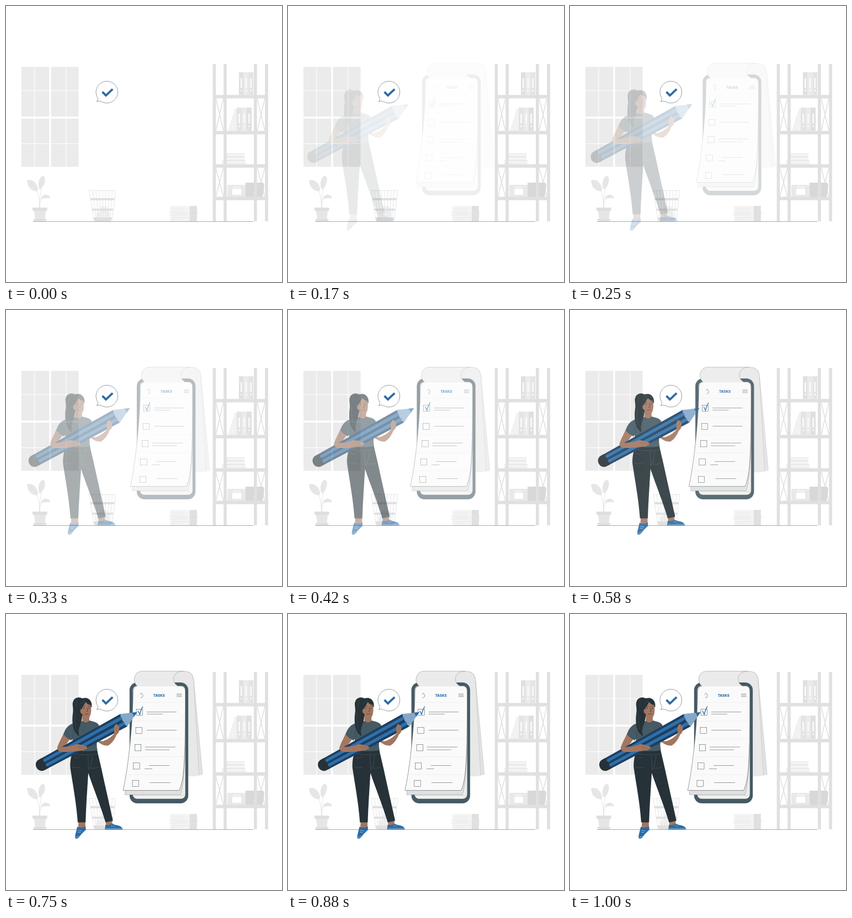
Animation, 500 px wide and 500 px high, one loop 1.04 s. Source, as an HTML page:

```html
<!DOCTYPE html>
<html lang="en">
<head>
<meta charset="utf-8">
<title>Task list</title>
<style>
  html, body { margin: 0; width: 100%; height: 100%; overflow: hidden; background: #fff; }
  svg { display: block; width: 100vw; height: 100vh; }
  .blue { fill: #2a6aa5; }
  .skin { fill: #a27660; }
  .dark { fill: #263238; }
  .shirt { fill: #455a64; }
  .ink { fill: none; stroke: #263238; stroke-width: .48; }
  .seam { fill: none; stroke: #63737a; stroke-width: .4; }
</style>
</head>
<body>
<svg viewBox="0 0 500 500" xmlns="http://www.w3.org/2000/svg">
  <!-- window -->
  <path fill="#ebebeb" d="M28 110.3H78.3V200.5H28ZM81.6 110.3H131.5V200.5H81.6ZM28 204H78.3V291.2H28ZM81.6 204H131.5V291.2H81.6Z"/>
  <path stroke="#fff" stroke-width="1.1" d="M52 110V291M109 110V291M28 153.3H132M28 249.5H132"/>

  <g id="shelf"></g>

  <!-- plant -->
  <g fill="#e6e6e6">
    <path d="M38 316C43 313 52 317 55 323C58 328 59 333 57 335C51 337 42 331 40 325Z"/>
    <path d="M61 332C57 326 59 310 66 308C72 307 72 318 68 325C66 329 63 332 61 332Z"/>
    <path d="M63 350C64 343 70 341 74 342C78 343 80 346 80 348C74 348 67 348 63 350Z"/>
    <path d="M51 371H72L70.5 386H52.5Z"/>
  </g>
  <path fill="none" stroke="#e0e0e0" stroke-width=".8" d="M56 334Q61 348 60.5 366M64 330Q60 347 61 366M66 347Q61 352 61 366"/>
  <path fill="#dedede" d="M48 365.3H74.5V371H48ZM49 386H74L72 389.8H51Z"/>

  <!-- basket -->
  <path fill="#f2f2f2" d="M163 383L164 375L170 371L172 363L181 362L187 368L188 383Z"/>
  <path fill="none" stroke="#e6e6e6" stroke-width=".7" d="M164 376L172 380L178 370L186 378M172 365L179 372"/>
  <g id="basket" fill="none" stroke="#e0e0e0"></g>
  <path fill="#e0e0e0" d="M152.6 348H197L196.3 352H153.2ZM155.5 367.3H194.2L193.6 370.8H156ZM158 383H192.2L191 388L189 390H161L159 388Z"/>

  <!-- paper stack -->
  <path fill="#f3f3f3" d="M297.5 362.3H333V390H297.5Z"/>
  <path fill="#e0e0e0" d="M333 362.3H345.8V390H333ZM345 374H348V375.5H345ZM345 380H347V381.2H345Z"/>
  <path fill="none" stroke="#e3e3e3" stroke-width=".6" d="M298 368H325M294 373.5H328M303 376H333M294 378.5H326M300 383.5H333M298 387H318"/>

  <path stroke="#263238" stroke-width=".42" d="M49 390.5H448"/>

  <!-- speech bubble -->
  <path class="ink" style="fill:#fff" d="M164.2 173.3Q167 170.5 166.4 167.2A19.8 19.8 0 1 1 172.2 172.8Q169 171.2 164.2 173.3Z"/>
  <path fill="none" stroke="#2a6aa5" stroke-width="3.8" d="M174.6 155.6L181 162.1L193.2 150.7"/>

  <!-- phone with paper list -->
  <g id="phone">
    <path fill="#e2e2e2" d="M322 104C337 103 341 110 341.5 124L357 290Q350 292 346 291L331 293V110Z"/>
    <path fill="#e8e8e8" d="M322 103.6C309 104 304 111 304.5 119L308 127L331 140V293.5Q341 295 350.5 292.5L341.2 126C340.8 111 337 104 322 103.6Z"/>
    <path class="ink" style="stroke:#aaa;stroke-width:.4" d="M341 125L350.5 292.5M341.5 124L357 290Q353 292 350.5 291.5"/>
    <path class="ink" style="stroke:#777;stroke-width:.4" d="M322 103.6C336 104 341 110 341.4 126"/>
    <rect x="224.8" y="124" width="106.3" height="219" rx="14" fill="#455a64"/>
    <rect x="230.6" y="130" width="95.2" height="204.8" rx="8" fill="#f0f0f0"/>
    <path fill="#ededed" stroke="#999" stroke-width=".3" d="M231 320V328H316Q322 333 325.5 325V200H300Z"/>
    <path fill="#e0e0e0" stroke="#777" stroke-width=".4" d="M217 318L216.3 327.6H317Q323 312 325.6 240L310 230Z"/>
    <path class="ink" style="fill:#fafafa" d="M240 130.4C234 130.6 231.4 134 231.2 142C230.8 175 228 215 224 250Q219.5 290 213.2 319.6H314.8Q321 306 323 280C325.6 245 325.9 190 325.8 139Q325.4 130.6 318 130.4Z"/>
    <path fill="#ebebeb" d="M239 131Q232.6 125 233.2 117Q235 105 246 103.6H322C309 104 304 111 304.5 119Q305 126 313 131Z"/>
    <path class="ink" style="stroke:#777;stroke-width:.45" d="M239 131Q232.6 125 233.2 117Q235 105 246 103.6H322C309 104 304 111 304.5 119Q305 126 313 131"/>
    <path fill="none" stroke="#e8e8e8" stroke-width=".6" d="M232 160H325M230 194H325M227 226H325M223 258.5H324M219 291H322"/>
    <text x="278.3" y="150.2" text-anchor="middle" class="blue" font-family="Inter, sans-serif" font-weight="800" font-size="6.3">TASKS</text>
    <path class="ink" d="M243.8 146.2L246.5 143L249 147L248.2 150.8L245 152M310 144.8H319.5M310 147.2H319.5M310 149.6H319.5"/>
    <g id="rows" class="ink"></g>
    <path fill="none" stroke="#2a6aa5" stroke-width="1.4" d="M240 175.5L243.2 181.8Q245 174 248.8 167.5"/>
  </g>

  <!-- woman with pencil -->
  <g id="woman">
    <g transform="translate(.6 0)">
    <path class="skin" d="M130 374H142L142.5 389H129ZM178.5 372H190.5L191 383H180Z"/>
    <path class="blue" d="M127.5 385.5Q135 389 142.6 384.8L143.2 391C139 395 135 398 132 403Q128 408 124 406.6C122.5 403 125.5 396 127.5 385.5Z"/>
    <path class="blue" d="M178.8 381.5Q185 384 190.6 379.8C196 383 204 382.5 207.5 386Q210 388 209.8 390.2H177.6Z"/>
    <path fill="none" stroke="#fff" stroke-width=".5" d="M129 392L136 393M128 395L134 396M191 382L189 385M195 383L193 386M123.8 405Q128 404 132 402M179 388.6H209"/>
    <path class="dark" d="M120 245H163.2C167 262 171.5 280 175 297L192.2 374.5L178.8 377.5C170 348 157 316 147.5 288C145.8 317 143.5 348 142.6 377.5H128.4C126 342 119 307 115 279C114 266 117 256 120 245Z"/>
    <path class="seam" d="M119 253Q141 257 165 253M147 256L148 282Q153 279 155 256M120 257Q125 265 132 258M151 279Q158 280 166 278M118 277Q127 280 133 277"/>
    <path class="skin" d="M103 216L117 222C112 231 106 238 104 240L112 241L106 251Q92 249 91.4 244C91 239 99 225 103 216ZM158 205L168 212L169 230L178 232L184 238Q174 239 164 231Z"/>
    <path class="shirt" d="M136 194L150 193C157 195 163 196 166 200C169 205 170 216 170.5 222L163.5 226Q162 237 164 247Q142 250 118.5 247L119 226L116.5 229Q107 224 102.5 218C106 207 112 200 121 198Z"/>
    <path class="skin" d="M137 182H149L149.5 193.5Q144 200 136.5 194Z"/>
    <path fill="none" stroke="#263238" stroke-width=".4" d="M119 226Q121 216 120 211M163.5 226Q162 216 160 212M136.5 194Q143 201 150 193.5M121 243L133 245M151 239L163 235"/>
    <path class="dark" d="M136 152.8C130 149.5 122 152 120.3 158C117.5 163 121 170 119.8 178C118 190 119 200 120.5 206Q123 217 131.5 221.5Q128.5 211 132 203Q136 193 136.5 185L150 168L153.5 169C155.5 160 150 152 142 152Z"/>
    <path class="skin" d="M136 171C138.5 166 141 163 142.5 159.5C145.5 163 149 164.5 152 165C153.8 174 152.5 185.5 147.8 188.6C143.5 190.5 138 187 136 180.5C133.6 180.5 132.4 176.5 133.4 173.5Q134.6 170.5 136 173Z"/>
    <path fill="none" stroke="#263238" stroke-width=".65" stroke-linecap="round" d="M136.5 168Q138.5 166 141 167.3M147 167.2Q149 165.8 151 167.2M145.4 170L146.4 176L144.2 176.4M141.5 181.5Q144.5 182 147.3 180.5"/>
    <path class="dark" d="M139.3 169.8a.8 1 0 1 1 0 2a.8 1 0 1 1 0-2M148.8 169.6a.8 1 0 1 1 0 2a.8 1 0 1 1 0-2"/>
    <path fill="none" stroke="#52626a" stroke-width=".4" d="M125 155Q128 159 125 169M123 176Q122 193 126 209M142 154Q139 160 132 164"/>

    <g transform="translate(62.2 273.9) rotate(-28.6)">
      <path fill="#1c3f61" d="M4 -10.8L170.5 -12.8V13L4 10.8Z"/>
      <path fill="#306fa9" d="M4 -7.2L170.5 -8.5V-2.6L4 -2.1ZM4 2.1L170.5 2.6V8.5L4 7.2Z"/>
      <path class="dark" d="M7 -10.9H1C-13 -10.7 -13 10.7 1 10.9H7Q10 8 7 5Q10 0 7 -5Q10 -8 7 -10.9Z"/>
      <path fill="#85a8c9" d="M170.5 -12.8L198.6 -1.2L170.5 13Q167.5 8 169.5 4Q166.5 0 169.5 -4Q167.5 -8 170.5 -12.8Z"/>
      <path class="blue" d="M189.2 -5.1L198.8 -1.2L189.2 3.6Q191 -1 189.2 -5.1Z"/>
    </g>

    <path class="skin" d="M92 240Q105 242 118 238.5L127 235.8C132 236 138 238 145.2 240.2Q147 241.3 143 242L146 243Q146 245 141 245.2Q142 247.5 136 247.3C126 249 112 250.5 100 250Q90 249 92 240Z"/>
    <path class="skin" d="M169 231Q182 230 194.5 217L194.2 207Q194.5 202 197.5 199.8Q200.5 198.5 200.5 202Q204.5 203 203.5 209Q204.5 214 199 218.5Q193 233 183.5 238.5Q174 238.5 169 234Z"/>
    <path fill="none" stroke="#704a3b" stroke-width=".35" d="M128 240L143 242M130 243L141 245M200.5 202Q200 208 197.5 211M203 209L199 215"/>
    </g>
  </g>
</svg>
<script>
  const byId = id => document.getElementById(id);
  const rect = (x, y, w, h, fill) => `<rect x="${x}" y="${y}" width="${w}" height="${h}" fill="${fill}"/>`;
  const line = (x1, y1, x2, y2) => `M${x1} ${y1}L${x2} ${y2}`;

  function binder(x, y, w, h, fill) {
    return rect(x, y, w, h, fill) + rect(x + w / 2 - 1.4, y + 11, 2.8, h * .42, '#fafafa') +
      `<circle cx="${x + w / 2}" cy="${y + h - 8}" r="1.6" fill="#fafafa"/>`;
  }

  function shelf() {
    const gray = '#e0e0e0';
    let braces = '', out = '';
    for (const x of [380, 455]) for (const [top, bottom] of [[167, 226], [293, 346]])
      braces += line(x, top, x + 14, bottom) + line(x + 14, top, x, bottom);
    out += `<path d="${braces}" stroke="${gray}" stroke-width="1.5"/>`;
    out += binder(422, 120, 8.6, 41, gray) + binder(430.6, 120, 8.6, 41, '#ebebeb') + binder(439.2, 120, 9, 41, '#e4e4e4');
    out += `<path fill="#f2f2f2" stroke="#e6e6e6" stroke-width=".5" d="M403 225L415 186L419 188V226H404Z"/>`;
    out += binder(418, 184, 9, 42, '#e4e4e4') + binder(427, 184, 9, 42, '#ebebeb') + binder(436, 184, 9, 42, gray);
    for (const [x, y, w] of [[398, 267, 34], [396, 273.5, 36], [391, 280, 43]])
      out += rect(x, y, w, 6, '#f5f5f5') + rect(x, y, w, .8, gray) + rect(x, y + 5.2, w, .8, gray);
    out += rect(401, 324, 33, 22, '#e9e9e9') + rect(410, 331, 16, 11, '#fff') + rect(412, 327.5, 12, 1.5, '#fafafa');
    out += `<path fill="#d8d8d8" d="M434 320H466L468 325L465 346H434Z"/>`;
    for (const x of [374.6, 394.2, 449, 469.2]) out += rect(x, 105, 5.6, 285, gray);
    for (const y of [161.2, 226.3, 286.7, 345.6]) out += rect(375, y, 100, 6.2, gray);
    return out;
  }

  function basket() {
    let d = 'M150.5 334.2H199';
    for (let i = 0; i <= 8; i++) d += line(150.7 + i * 6, 334, 159.5 + i * 4.1, 388);
    return `<path stroke-width=".8" d="${d}"/>`;
  }

  function rows() {
    const boxes = [[237, 172.3], [236, 205.5], [234.3, 236.7], [231.6, 269.8], [230, 301.2]];
    const rules = [[256, 177.5, 310], [256, 181.3, 285], [256, 210.5, 310], [253, 241, 308], [253, 246, 297],
      [260, 274.5, 297], [252, 280.5, 266], [261, 305.5, 299]];
    return boxes.map(([x, y]) => `<rect x="${x}" y="${y}" width="11.4" height="11.2"/>`).join('') +
      `<path d="${rules.map(([x, y, end]) => line(x, y, end, y)).join('')}"/>`;
  }

  byId('shelf').innerHTML = shelf();
  byId('basket').innerHTML = basket();
  byId('rows').innerHTML = rows();

  const LOOP = 1040, FPS = 24, DISTANCE = 20;
  const curve = (s, a, b) => 3 * (1 - s) ** 2 * s * a + 3 * (1 - s) * s * s * b + s ** 3;

  // cubic-bezier(.36, -.01, .5, 1.38): slides slightly past the end and back
  function ease(x) {
    let low = 0, high = 1;
    for (let i = 0; i < 30; i++) {
      const mid = (low + high) / 2;
      if (curve(mid, .36, .5) < x) low = mid; else high = mid;
    }
    return curve(low, -.01, 1.38);
  }

  function place(id, x, opacity) {
    byId(id).setAttribute('transform', `translate(${x} 0)`);
    byId(id).setAttribute('opacity', opacity);
  }

  function draw(ms) {
    const step = Math.min(FPS, Math.floor(ms * FPS / 1000 + .1));
    const progress = ease(step / FPS);
    const opacity = step < 3 ? 0 : Math.min(1, progress);
    const shift = DISTANCE * (1 - progress);
    place('woman', -shift, opacity);
    place('phone', shift, opacity);
  }

  const start = performance.now();
  function tick() {
    draw((performance.now() - start) % LOOP);
    requestAnimationFrame(tick);
  }
  tick();
</script>
</body>
</html>
```
